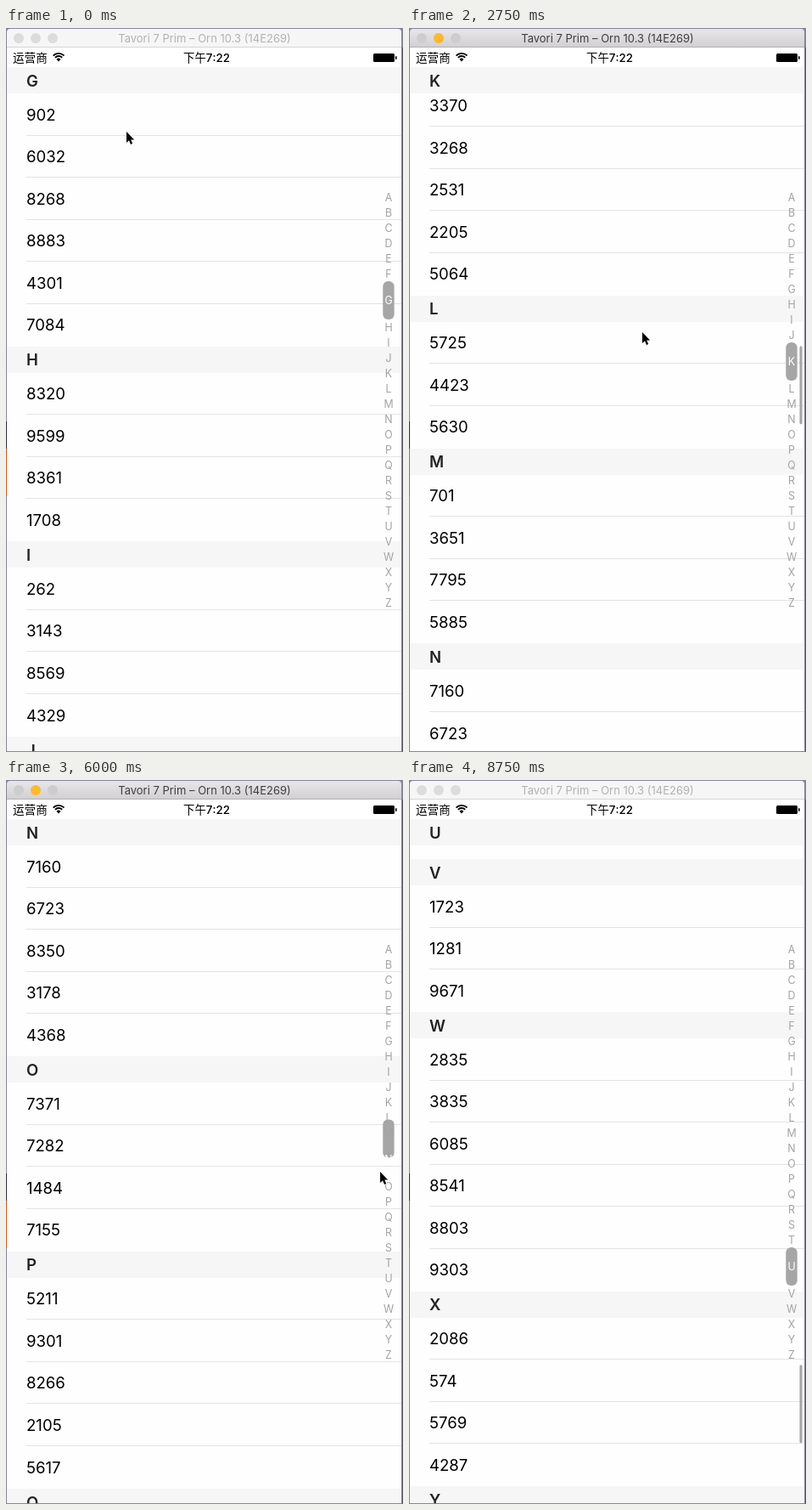
Animation of 468 by 852 pixels, one loop 9 s. Source, as an HTML page with a canvas:

```html
<!DOCTYPE html>
<html lang="zh">
<head>
<meta charset="utf-8">
<style>
html, body { margin: 0; width: 100%; height: 100%; overflow: hidden; }
canvas { display: block; }
</style>
</head>
<body>
<canvas id="stage" width="468" height="852"></canvas>
<script>
const ctx = document.getElementById('stage').getContext('2d');
const CJK = '"Noto Sans CJK SC", "Noto Sans CJK", sans-serif';
const UI = 'Inter, ' + CJK;
const LOOP = 9000, STEP = 250;
const TOP = 46, HEAD = 31.52, ROW = 49.53;
const arrow = new Path2D('M0 0V13L3 10.3L5 15L7.2 14L5.2 9.5H9.2Z');

// The list text, one line per letter; "-" is filled with a random number.
let seed = 7;
const random = () => (seed = seed * 16807 % 2147483647) / 2147483647;
const listText = `- - - - -
6545 5546 1532 8600 6050 1162
6073 3685 8009 7740 5924
2314 1171 2019 3858 6553
6242 5786 4295 874
5952 6151 4608 79 6016 -
902 6032 8268 8883 4301 7084
8320 9599 8361 1708
262 3143 8569 4329
- - 2821 1801 5456
4307 3370 3268 2531 2205 5064
5725 4423 5630
701 3651 - -
- - - - -
- - - -
- - - - -
8689 1489 5425
9677 6285 8118 2481 5373 6968
2962 1659 1055 8666 5038
7914 9822 6044 4308 8099
8998 8593 2683 1679 9451
1723 1281 9671
2835 3835 6085 8541 8803 9303
2086 574 5769 4287
- - - - -
- - - - -`;

let total = 0;
const sections = listText.split('\n').map((line, i) => {
  const rows = line.split(' ').map(n => n === '-' ? String(1000 + Math.floor(random() * 9000)) : n);
  const section = { letter: String.fromCharCode(65 + i), rows, top: total, height: HEAD + ROW * rows.length };
  total += section.height;
  return section;
});
const topOf = letter => sections[letter.charCodeAt(0) - 65].top;

const mix = (a, b, f) => a + (b - a) * f;
function ease(t, from, to) {
  const p = Math.min(1, Math.max(0, (t - from) / (to - from)));
  return p * p * (3 - 2 * p);
}

// Pointer stops in seconds: [leave, arrive, x, y].
const stops = [
  [.25, 1.25, 275, 358],
  [2.75, 3.5, 450, 211],
  [4.7, 6.5, 439, 519],
  [6.5, 6.75, 439, 541],
  [6.75, 7.25, 268, 626],
  [8.25, 8.75, 20, 4]
];
function pointer(t) {
  let x = 142, y = 122;
  for (const [leave, arrive, toX, toY] of stops) {
    const f = ease(t, leave, arrive);
    x = mix(x, toX, f);
    y = mix(y, toY, f);
  }
  return [x, y];
}

// Wheel scrolling, then dragging along the index, then wheel scrolling.
const DRAG = 3.74, RELEASE = 6.75, FLICK = 7.7;
function scrollAt(t) {
  if (t < DRAG) return mix(topOf('G'), topOf('K') + 60, ease(t, .2, 2.7));
  if (t > FLICK) return mix(topOf('S'), topOf('V') - 47, ease(t, FLICK, 8.75));
  const y = pointer(Math.min(t, RELEASE))[1];
  return sections[Math.max(1, Math.floor((y - 217) / 18))].top;
}

const activeAt = t => sections.findLastIndex(s => s.top <= scrollAt(t) + .01);

// The pill trails the active letter with an ease-out.
function pillAt(t) {
  const lag = .35, n = 70;
  let sum = 0, weight = 0;
  for (let i = 0; i < n; i++) {
    const w = 1 - i / n;
    sum += w * activeAt(Math.max(0, t - lag * i / n));
    weight += w;
  }
  return sum / weight;
}

function rect(x, y, w, h, color) {
  ctx.fillStyle = color;
  ctx.fillRect(x, y, w, h);
}

function round(x, y, w, h, r, color) {
  ctx.fillStyle = color;
  ctx.beginPath();
  ctx.roundRect(x, y, w, h, r);
  ctx.fill();
}

function text(str, x, y, font, color, align = 'left') {
  ctx.font = font;
  ctx.fillStyle = color;
  ctx.textAlign = align;
  ctx.fillText(str, x, y);
}

function drawHeader(letter, y) {
  rect(1, Math.round(y), 465, 31, '#f6f6f6');
  text(letter, 24, Math.round(y + 22.6), `600 18.6px ${UI}`, '#222');
}

function drawList(scroll, active) {
  ctx.save();
  ctx.beginPath();
  ctx.rect(1, TOP, 465, 805);
  ctx.clip();
  for (const s of sections) {
    const y = TOP + s.top - scroll;
    if (y > 852 || y + s.height < TOP) continue;
    s.rows.forEach((n, i) => {
      const rowY = y + HEAD + i * ROW;
      text(n, 24, Math.round(rowY + 31.1), `18.6px ${UI}`, '#000');
      if (i < s.rows.length - 1) rect(24, Math.floor(rowY + ROW - 1), 442, 1, '#e3e3e5');
    });
    drawHeader(s.letter, y);
  }
  const s = sections[active];
  drawHeader(s.letter, TOP + Math.min(0, s.top + s.height - scroll - HEAD));
  ctx.restore();
}

function drawIndex(active, pill) {
  round(444.3, 190 + 18 * pill, 13.4, 45, 6, '#a6a6a6');
  sections.forEach((s, i) => {
    const shift = 13.5 * (1 + Math.sign(i - active));
    text(s.letter, 451, 203.5 + 18 * i + shift, `12.4px ${UI}`,
      i === active ? '#fff' : '#a3a3a3', 'center');
  });
}

function drawStatus() {
  rect(1, 23, 465, 23, '#fff');
  text('运营商', 8, 39.5, `13.6px ${CJK}`, '#000');
  text('下午7:22', 236.5, 39.5, `500 13.4px ${UI}`, '#000', 'center');
  ctx.strokeStyle = '#000';
  ctx.lineWidth = 1.8;
  for (const r of [8.8, 5.6]) {
    ctx.beginPath();
    ctx.arc(62, 38.6, r, -Math.PI * .76, -Math.PI * .24);
    ctx.stroke();
  }
  ctx.fillStyle = '#000';
  ctx.beginPath();
  ctx.moveTo(62, 39.4);
  ctx.arc(62, 39.2, 3.4, -Math.PI * .76, -Math.PI * .24);
  ctx.fill();
  round(433, 30, 25, 10, 1.5, '#000');
  round(459, 33, 1.6, 4, 1, '#000');
}

function drawTitle(focused) {
  const bar = ctx.createLinearGradient(0, 1, 0, 23);
  bar.addColorStop(0, focused ? '#e8e6e8' : '#f6f6f6');
  bar.addColorStop(1, focused ? '#d1cfd1' : '#f6f6f6');
  round(1, 1, 465, 22, [4, 4, 0, 0], bar);
  rect(1, 22, 465, 1, focused ? '#b4b2b4' : '#d6d6d6');
  for (const x of [15, 35, 55]) {
    round(x - 6, 6, 12, 12, 6, !focused ? '#dcdcdc' : x === 35 ? '#fdb92e' : '#cecdce');
  }
  text('Tavori 7 Prim – Orn 10.3 (14E269)', 234, 16.7, `13px ${UI}`,
    focused ? '#3e3e3e' : '#b2b2b2', 'center');
}

function drawPointer(x, y) {
  ctx.save();
  ctx.translate(x, y);
  ctx.strokeStyle = '#fff';
  ctx.lineWidth = 1.8;
  ctx.stroke(arrow);
  ctx.fillStyle = '#000';
  ctx.fill(arrow);
  ctx.restore();
}

function draw(t) {
  const scroll = scrollAt(t), active = activeAt(t);
  const wheel = t >= .25 && t < 3 || t > FLICK;

  rect(0, 0, 468, 852, '#86849a');
  rect(0, 463, 1, 32, '#2b2a30');
  rect(0, 495, 1, 55, '#cf5a22');
  rect(467, 23, 1, 829, '#55535f');
  rect(1, 23, 465, 828, '#fefefe');

  drawList(scroll, active);
  drawIndex(active, pillAt(t));
  if (wheel) round(460.5, 50.6 + scroll * .1135, 3, 92, 1.5, '#a4a4a4');
  drawStatus();
  drawTitle(t >= .25 && t < 8.75);
  if (t < 8.75) drawPointer(...pointer(t));
}

function tick() {
  const ms = performance.now() % LOOP;
  draw(Math.floor(ms / STEP) * STEP / 1000);
  requestAnimationFrame(tick);
}
tick();
</script>
</body>
</html>
```
